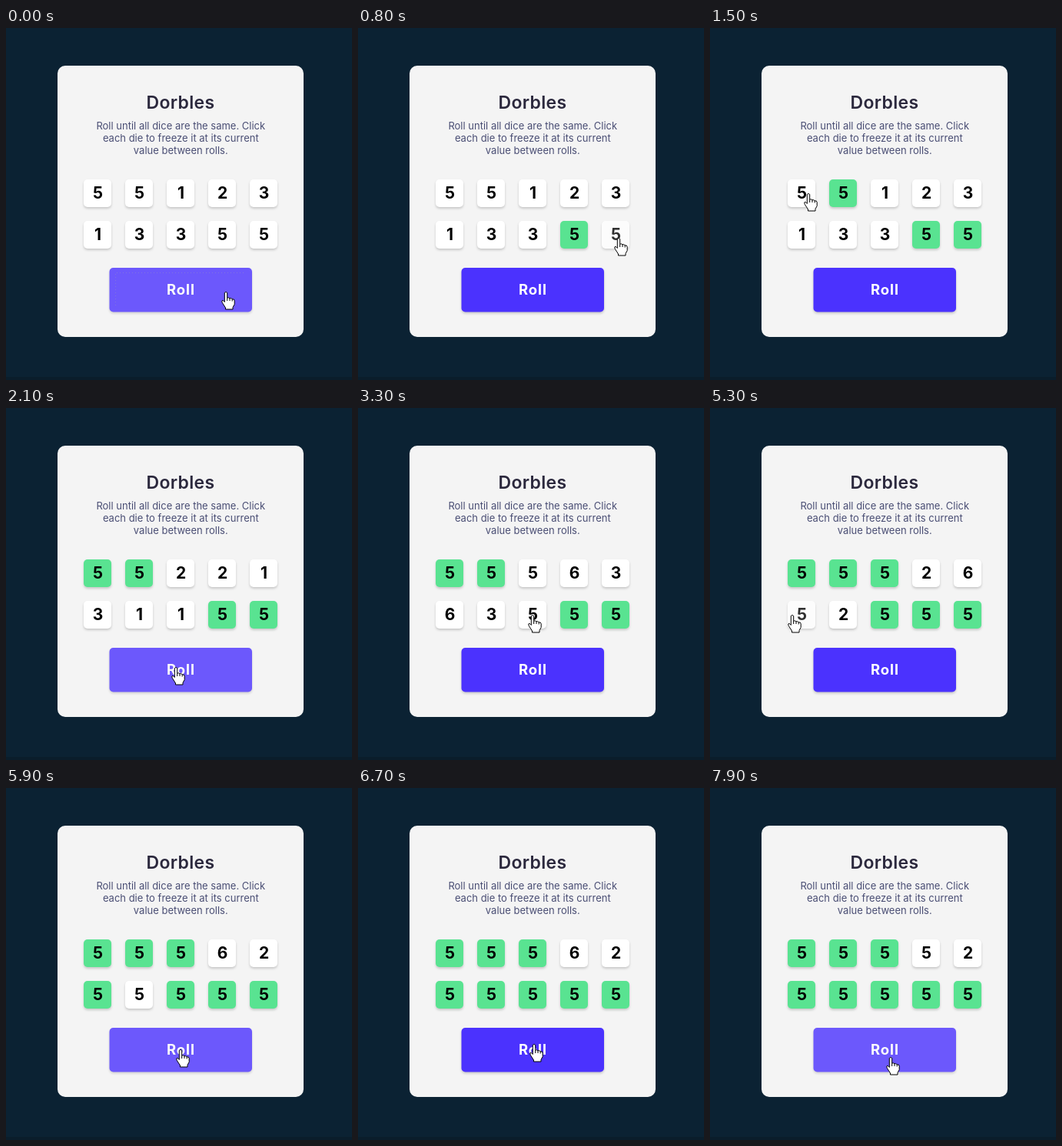
These frames come from a looping animation (450x458 px, 8000 ms). An HTML page:

```html
<!DOCTYPE html>
<html lang="en">
<head>
<meta charset="utf-8">
<title>Dorbles</title>
<style>
  html, body { margin: 0; width: 100%; height: 100%; overflow: hidden; background: #0b2233; }
  svg { display: block; width: 450px; height: 458px; }
  text { font-family: Inter, "Open Sans", sans-serif; text-anchor: middle; }
  .title { font-size: 23px; font-weight: 600; letter-spacing: .3px; fill: #2b283d; }
  .intro { font-size: 13px; fill: #4a4e74; }
  .die { font-size: 21px; font-weight: 700; }
  .roll { font-size: 18.5px; font-weight: 700; letter-spacing: .9px; fill: #fff; }
  .raised { filter: drop-shadow(0 2px 1.5px rgba(0, 0, 0, .18)); }
  .hover { opacity: .8; }
  #cursor path { fill: #fff; stroke: #000; stroke-linejoin: round; }
</style>
</head>
<body>
<svg viewBox="0 0 450 458">
  <rect width="450" height="458" fill="#0b2233"/>
  <rect y="454" width="450" height="4" fill="#0a1d2b"/>
  <rect x="67" y="49" width="320" height="353" rx="10" fill="#f4f4f4"/>
  <text class="title" x="227" y="105">Dorbles</text>
  <g class="intro">
    <text x="227.300" y="132">Roll until all dice are the same. Click</text>
    <text x="227.300" y="148">each die to freeze it at its current</text>
    <text x="227.300" y="164">value between rolls.</text>
  </g>
  <g id="dice"></g>
  <g id="button">
    <rect class="raised" x="134.500" y="312" width="185.500" height="57.500" rx="5" fill="#4b32fe"/>
    <path id="focus" d="M142.500 361V318.500H312" fill="none" stroke="#8a86a8" stroke-dasharray="1 3" opacity=".4"/>
    <text class="roll" x="227.500" y="347">Roll</text>
  </g>
  <g id="cursor">
    <path id="arrow" d="M.5 .5V17L4.300 13.400 6.800 19.200 9.200 18.200 6.700 12.500H12Z"/>
    <path id="hand" d="M-1.700 1.500Q0-.6 1.700 1.500V8.300Q3.600 6.900 5 8.900Q6.900 7.900 8.200 9.800Q10.800 9.200 11.200 11.800V16.500L9 20.500V23H-.5V21L-4.800 14.300Q-6 11.300-4 11.200L-1.700 13.500ZM1.700 8.300V12M5 8.900V12M8.200 9.800V12.500"/>
  </g>
</svg>
<script>
const LOOP = 8000, STEP = 100, SPEED = .45, SIZE = 36, PITCH = 54, BUTTON = 10, NONE = -1;

// Pointer trips: start time, goal (die or button), offset from its centre.
// A die freezes when the pointer sets off again.
const trips = [
  [0, BUTTON, 59, 3], [200, 8], [600, 9, 4, 4], [900, 1], [1400, 0], [1700, BUTTON, -6, -3],
  [3100, 7], [3600, 2], [3900, BUTTON, -4, -7], [4900, 5, -12], [5400, BUTTON],
  [6100, 6], [6500, BUTTON, 2, -7], [6700, BUTTON, 8, 10]
].map(([go, goal, dx = 0, dy = 0]) => {
  const [x, y] = center(goal);
  return { go, goal, x: x + dx, y: y + dy };
});
// Rolls: time and new faces of the dice that are not frozen
const rolls = [
  [0, "5512313355"], [2100, "221311"], [2700, "563635"], [4500, "2652"],
  [5900, "625"], [7000, "34"], [7800, "52"]
];

const $ = id => document.getElementById(id);

function center(i) {
  return i === BUTTON ? [227, 340] : [119 + PITCH * (i % 5), 215 + PITCH * Math.floor(i / 5)];
}

$("dice").innerHTML = Array.from({ length: 10 }, (_, i) => {
  const [x, y] = center(i);
  return `<rect class="raised" x="${-SIZE / 2}" y="${-SIZE / 2}" width="${SIZE}" height="${SIZE}" rx="5"/>
    <text class="die" x=".5" y="7"></text>`.replace(/^/, `<g transform="translate(${x} ${y})">`) + "</g>";
}).join("");
const dice = [...$("dice").children];

const frozen = (die, t) => trips.some((trip, n) => trip.goal === die && trips[n + 1]?.go <= t);

function facesAt(t) {
  const faces = [];
  for (const [time, values] of rolls.filter(r => r[0] <= t)) {
    let n = 0;
    dice.forEach((_, i) => { if (!frozen(i, time)) faces[i] = values[n++]; });
  }
  return faces;
}

// Constant speed from the last goal to the next
function pointer(t) {
  const n = Math.max(0, trips.findLastIndex(trip => trip.go <= t));
  const to = trips[n], from = trips[Math.max(0, n - 1)];
  const length = Math.hypot(to.x - from.x, to.y - from.y) || 1;
  const k = Math.min(1, (t - to.go) * SPEED / length);
  return n ? [from.x + (to.x - from.x) * k, from.y + (to.y - from.y) * k] : [to.x, to.y];
}

function target([px, py]) {
  const over = (i, w, h) => {
    const [x, y] = center(i);
    return Math.abs(px - x) <= w / 2 && Math.abs(py - y) <= h / 2;
  };
  return over(BUTTON, 185, 57) ? BUTTON : dice.findIndex((_, i) => over(i, SIZE, SIZE));
}

function draw(t) {
  const pos = pointer(t), now = target(pos), before = target(pointer(t - STEP));
  // Hover styling trails the pointer by one step
  const hovered = now === NONE || now === before ? before : NONE;
  const faces = facesAt(t);
  dice.forEach((die, i) => {
    die.firstElementChild.setAttribute("fill", frozen(i, t) ? "#59e391" : "#fff");
    die.lastElementChild.textContent = faces[i];
    die.classList.toggle("hover", i === hovered);
  });
  $("button").classList.toggle("hover", hovered === BUTTON);
  $("focus").style.display = t < STEP ? "" : "none";
  $("hand").style.display = now === NONE ? "none" : "";
  $("arrow").style.display = now === NONE ? "" : "none";
  $("cursor").setAttribute("transform", `translate(${pos})`);
}

const start = performance.now();
function tick() {
  const t = (performance.now() - start) % LOOP;
  draw(Math.floor(t / STEP) * STEP);
  requestAnimationFrame(tick);
}
tick();
</script>
</body>
</html>
```
